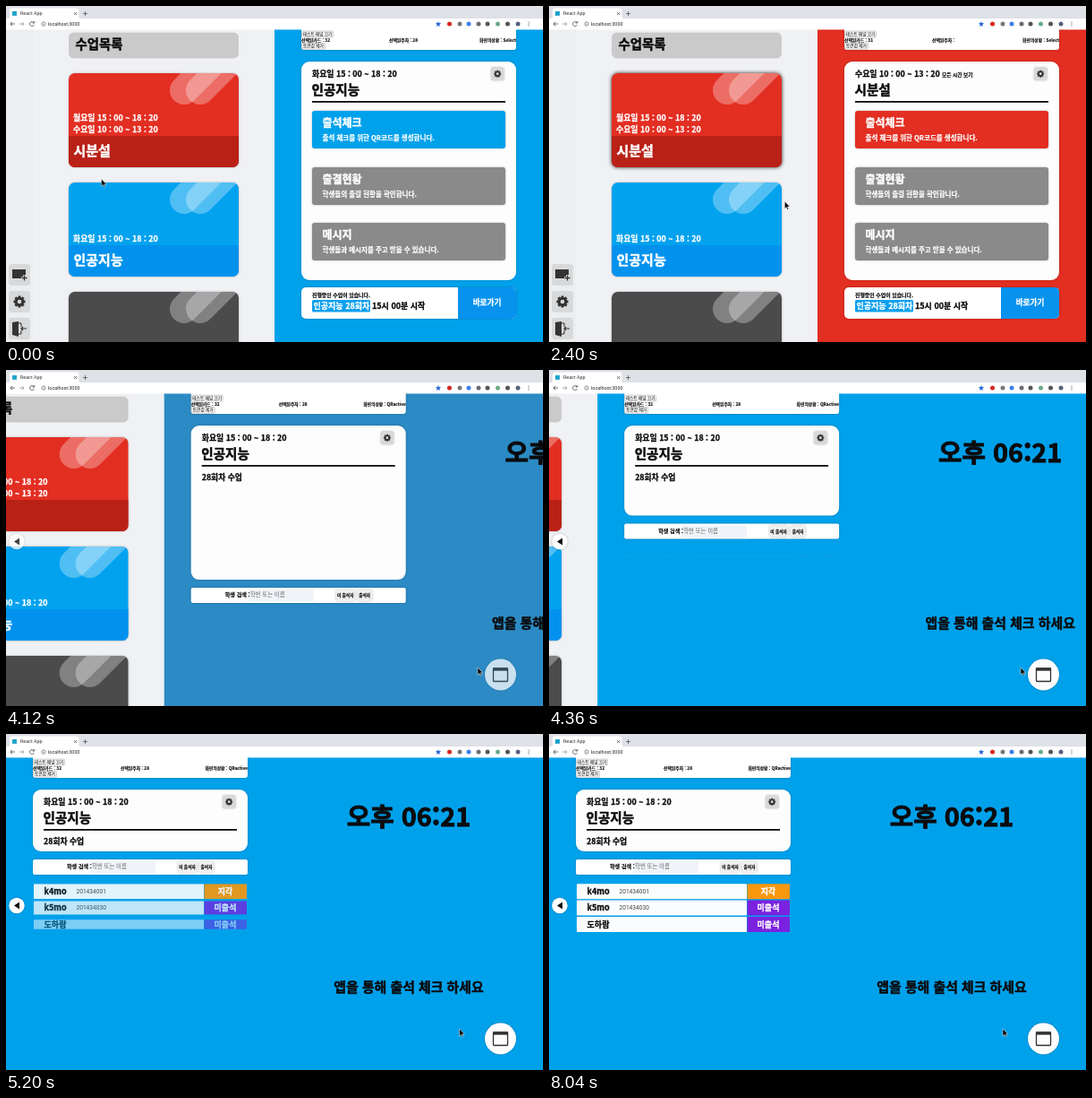
Recreate the animation shown at these times as an HTML page. Size 600 px wide and 375 px high, loop 8.08 s.

```html
<!DOCTYPE html>
<html lang="ko">
<meta charset="utf-8">
<title>React App</title>
<style>
html, body { margin: 0; width: 100%; height: 100%; overflow: hidden }
svg { display: block; width: 600px; height: 375px; font: 900 9px "Noto Sans CJK KR", "Noto Sans CJK", sans-serif }
.ui { font: 400 6px Roboto, sans-serif }
.thin { font-weight: 400 }
.semi { font-weight: 700 }
.ui, .ui text, .thin { stroke: none }
.shade { filter: drop-shadow(0 .7px 1px #0004) }
text { white-space: pre }
</style>
<body>
<script>
const BLUE = '#00a1eb', RED = '#e32e22', GRAY = '#8b8a8b', INK = '#0b0b0d';
const LOOP = 8080, PICK = 1090, OPEN = 3895;

const rect = (x, y, w, h, fill, r = 0, more = '') =>
  `<rect x="${x}" y="${y}" width="${w}" height="${h}" rx="${r}" fill="${fill}" ${more}/>`;
const circle = (x, y, r, fill, more = '') => `<circle cx="${x}" cy="${y}" r="${r}" fill="${fill}" ${more}/>`;
// A thin outline in the fill colour gives the heavy display weight.
const text = (x, y, size, s, fill = INK, more = '') =>
  `<text x="${x}" y="${y}" fill="${fill}" stroke="${fill}" stroke-width="${size * .03}" style="font-size:${size}px" ${more}>${s}</text>`;
const line = (d, color, w = 1, more = '') => `<path d="${d}" fill="none" stroke="${color}" stroke-width="${w}" ${more}/>`;
const group = (id, inner, more = '') => `<g id="${id}" ${more}>${inner}</g>`;
const MID = 'text-anchor="middle"', END = 'text-anchor="end"';

const gear = (x, y, r) => `<g transform="translate(${x} ${y})">` +
  circle(0, 0, r * .58, 'none', `stroke="#333" stroke-width="${r * .46}"`) +
  [0, 45, 90, 135].map(a => line(`M0 ${-r}V${-r * .7}M0 ${r}V${r * .7}`, '#333', r * .45, `transform="rotate(${a})"`)).join('') + '</g>';

function lesson(id, y, fill, band, times, name) {
  const stripe = x => line(`M${x} ${y + 19}l50 -50`, '#fff', 32, 'stroke-linecap="round" opacity=".3"');
  return group(id, `<clipPath id="c${id}">${rect(70, y, 190, 105, '#000', 7)}</clipPath><g clip-path="url(#c${id})">` +
    rect(70, y, 190, 105, fill) + rect(70, y + 70, 190, 35, band) + stripe(199) + stripe(217) +
    times.map((s, i) => text(75, y + 66 - 13 * (times.length - 1 - i), 8.9, s, '#fff')).join('') +
    text(75.5, y + 92, 15, name, '#fff') + '</g>', 'class="shade"');
}

const sideButton = (y, icon) => rect(3, y, 24, 24, '#d8d9da', 3) + icon;

const list = rect(0, 26, 300, 349, '#f0f1f4') + rect(0, 26, 30, 349, '#eceef0') +
  rect(70.5, 30, 189, 28, '#cacaca', 5, 'stroke="#bfbfbf" stroke-width=".6"') + text(77.5, 48, 14.4, '수업목록') +
  lesson('red', 75, RED, '#b92117', ['월요일 15 : 00 ~ 18 : 20', '수요일 10 : 00 ~ 13 : 20'], '시분설') +
  lesson('blue', 197, '#03a2ee', '#0292ee', ['화요일 15 : 00 ~ 18 : 20'], '인공지능') +
  lesson('dark', 319, '#4b4b4b', '#333', [], '') +
  sideButton(288, '<path d="M7 294h15v10H7z" fill="#333"/>' + line('M20.5 300v7M17 303.5h7', '#d8d9da', 3) + line('M20.5 300.5v6M17.5 303.5h6', '#333', 1.3)) +
  sideButton(318, gear(15, 330, 6.5)) +
  sideButton(348, '<path d="M7 353l7 -1v17l-7 -2z" fill="#333"/>' + line('M14 354h3v4M14 366h3v-4', '#333') + line('M23 360h-6m2 -2l-2 2 2 2', '#333', 1.2));

const menuItem = (y, title, note, id) =>
  rect(42, y, 216, 42, GRAY, 3, `class="shade" ${id ? `id="${id}"` : ''}`) +
  text(53.5, y + 17.5, 12, title, '#fff') + text(53.5, y + 33, 7.5, note, '#fff', 'class="semi"');

const tinyButton = (x, y, w, h, size, s) =>
  rect(x, y, w, h, '#efefef', 1, 'stroke="#aaa" stroke-width=".5"') + text(x + w / 2, y + h / 2 + size * .36, size, s, INK, MID + ' class="thin"');

const testBox = rect(30, 24, 240, 25, '#fff', 3, 'class="shade"') +
  tinyButton(30.5, 28, 35, 7, 4.7, '테스트 패널 끄기') + tinyButton(30.5, 41.3, 26, 7, 4.7, '토큰값 제거') +
  text(30, 40, 4.8, '', INK, 'id="cardNo"') + text(128, 40, 4.8, '', INK, 'id="week"') + text(270, 40, 4.8, '', INK, END + ' id="mode"');

const heading = text(42, 78.6, 8.9, '', INK, 'id="time"') + text(139, 78.5, 5.7, '모든 시간 보기', INK, 'id="allTimes"') +
  text(41.5, 99.2, 14.6, '', INK, 'id="subject"') + rect(42, 106, 216, 1.8, INK) +
  rect(242, 68.5, 14.5, 14.5, '#d8d9da', 2, 'class="shade"') + gear(249.2, 75.7, 4);

const menu = menuItem(117, '출석체크', '출석 체크를 위한 QR코드를 생성합니다.', 'check') +
  menuItem(180, '출결현황', '학생들의 출결 현황을 확인합니다.') +
  menuItem(242, '메시지', '학생들과 메시지를 주고 받을 수 있습니다.') +
  rect(30, 314, 240, 35, '#fff', 5, 'class="shade"') +
  '<path d="M205 314h60a5 5 0 0 1 5 5v25a5 5 0 0 1 -5 5h-60z" fill="#0792ee"/>' +
  text(237.5, 334, 8.6, '바로가기', '#fff', MID) + text(42, 325, 5.9, '진행중인 수업이 있습니다.') +
  rect(42, 328, 65, 13.5, '#0ba0ee', 1.5) + text(43.5, 338, 9, '인공지능 28회차', '#fff', 'class="semi"') +
  text(109, 338, 9, '15시 00분 시작', INK, 'class="semi"');

const students = [['k4mo', '201434001', '지각', '#f9970d'], ['k5mo', '201434030', '미출석', '#7a22df'], ['도하람', '', '미출석', '#7a22df']];
const rowY = i => 167.2 + i * 18.4;
const row = ([name, no, state, color], i) => {
  const y = rowY(i);
  return `<clipPath id="clip${i}">${rect(30, y, 240, 0, '#000', 0, `id="slot${i}"`)}</clipPath>` +
    group('row' + i, rect(31, y, 190, 17, '#fafcfd', 1) + rect(221.5, y, 47.5, 17, color, 1) +
      text(55, y + 11.8, 9, name, INK, MID) + text(78.5, y + 10.8, 6.6, no, '#444', 'class="ui"') +
      text(245, y + 11.8, 9, state, '#fff', MID + ' class="semi"'), `clip-path="url(#clip${i})"`);
};

const roster = rect(30, 140, 240, 17, '#fff', 2, 'class="shade"') + rect(94, 142, 73, 13, '#f0f3f8') +
  text(68, 150.2, 6.1, '학생 검색 :') + text(96, 150.2, 6.4, '학번 또는 이름', '#666', 'class="thin"') +
  [[192, 21, '미 출석자'], [215.5, 17, '출석자']].map(([x, w, s]) =>
    rect(x, 142, w, 13, '#f0f0f0', 2, 'class="shade"') + text(x + w / 2, 150, 4.7, s, INK, MID)).join('') +
  students.map(row).join('');

const panel = rect(0, 26, 600, 349, BLUE, 0, 'id="back"') + testBox +
  rect(30, 62, 240, 244, '#fdfdfd', 9, 'id="sheet" class="shade"') + heading + group('menu', menu) +
  group('lecture', text(42, 123, 8.8, '28회차 수업', INK, 'class="semi"') + group('roster', roster) +
    text(450, 103, 28.8, '오후 06:21', INK, MID) + text(450, 287.8, 14.9, '앱을 통해 출석 체크 하세요', INK, MID + ' class="semi"'));

const floating = circle(12, 191.5, 8.7, '#fff', 'class="shade"') + `<path d="M9 191.5l6 -4v8z" fill="${INK}"/>` +
  circle(552.5, 340, 17.5, '#fdfdfd', 'class="shade"') + rect(544.5, 333, 16, 14.5, 'none', .5, 'stroke="#333" stroke-width="1.3"') + rect(544, 332.5, 17, 3.2, '#333');

const extensions = [[495.5, '#d5271f'], [507, '#777'], [517, '#3f7fe8'], [528, '#6a6a75'], [538, '#555'], [549.5, '#69ab86'], [560.5, '#555'], [572, '#56627d']];
const browser = rect(0, 0, 600, 14.5, '#dee1e6') + rect(0, 14, 600, 12.4, '#fff') +
  '<path d="M2 14.5q2 0 2 -2V5q0 -2.5 2.5 -2.5H79q2.5 0 2.5 2.5v7.5q0 2 2 2z" fill="#fff"/>' +
  rect(7, 5.8, 5, 5, '#1fa4c9') + text(16, 10.3, 5.4, 'React App', '#333') +
  line('M76 7l3 3m0 -3l-3 3M86 8.5h5m-2.5 -2.5v5', '#444', .7) +
  line('M10 20H5m2.2 -2.2L5 20l2.2 2.2', '#444', .8) + line('M15 20h5m-2.2 -2.2L20 20l-2.2 2.2', '#999', .8) +
  line('M31.2 18.7a2.5 2.5 0 1 0 .2 2.2M31.5 17v2h-2', '#444', .8) +
  circle(42, 20, 2.2, 'none', 'stroke="#555" stroke-width=".6"') + line('M42 19.7v1.6M42 18.6v.6', '#555', .6) +
  text(47, 22, 5.4, 'localhost:3000', '#222') +
  '<path d="M483 17l.9 2 2.2 .2 -1.7 1.5 .5 2.2 -1.9 -1.2 -1.9 1.2 .5 -2.2 -1.7 -1.5 2.2 -.2z" fill="#2868d8"/>' +
  extensions.map(([x, c]) => circle(x, 20, 2.5, c)).join('') + [18, 20, 22].map(y => circle(584, y, .6, '#444')).join('');

document.body.innerHTML = '<svg viewBox="0 0 600 375">' + group('list', list) + group('panel', panel) + group('floating', floating) +
  group('browser', browser, 'class="ui"') +
  '<path id="cursor" d="M0 0V8.2L1.9 6.4 3.1 9.2 4.4 8.6 3.2 5.9H5.8Z" fill="#000" stroke="#fff" stroke-width=".5"/></svg>';

const $ = id => document.getElementById(id);
const set = (id, name, value) => $(id).setAttribute(name, value);
const move = (id, x, y = 0) => set(id, 'transform', `translate(${x} ${y})`);
const show = (id, on) => set(id, 'opacity', +on);
const unit = v => Math.max(0, Math.min(1, v));
const mix = (a, b, p) => a + (b - a) * p;

// CSS "ease": cubic-bezier(.25, .1, .25, 1)
function ease(x) {
  if (x <= 0 || x >= 1) return unit(x);
  const curve = (a, b, s) => 3 * a * s * (1 - s) ** 2 + 3 * b * s * s * (1 - s) + s ** 3;
  let lo = 0, hi = 1;
  for (let i = 0; i < 20; i++) {
    const s = (lo + hi) / 2;
    if (curve(.25, .25, s) < x) lo = s; else hi = s;
  }
  return curve(.1, 1, lo);
}
const during = (t, start, length) => ease((t - start) / length);
const blend = p => `rgb(${[[0, 227], [161, 46], [235, 34]].map(([a, b]) => Math.round(mix(a, b, p)))})`;

const path = [[0, 106.5, 193], [150, 106.5, 193], [800, 119.5, 156], [1800, 119.5, 156], [3300, 527, 332], [4450, 527, 332], [5100, 506.5, 329], [LOOP, 507, 329]];
function cursorAt(t) {
  const i = path.findIndex(p => p[0] > t), [t0, x0, y0] = path[i - 1], [t1, x1, y1] = path[i];
  const u = (t - t0) / (t1 - t0), p = u * u * (3 - 2 * u);
  return [mix(x0, x1, p), mix(y0, y1, p)];
}

function draw(t) {
  const picked = t >= PICK && t < OPEN, open = t >= OPEN;
  const slide = during(t, OPEN, 900), height = mix(244, 69, slide);
  move('list', -300 * slide);
  move('panel', 300 * (1 - slide));
  move('roster', 0, height - 69);
  set('sheet', 'height', height);
  set('back', 'fill', blend(during(t, PICK, 500) - during(t, OPEN, 450)));
  set('check', 'fill', picked ? RED : BLUE);
  $('cardNo').textContent = '선택된카드 : ' + (picked ? 31 : 32);
  $('week').textContent = '선택된주차 : ' + (picked ? '' : 28);
  $('mode').textContent = '화면의상황 : ' + (open ? 'QRactive' : 'Select');
  $('time').textContent = picked ? '수요일 10 : 00 ~ 13 : 20' : '화요일 15 : 00 ~ 18 : 20';
  $('subject').textContent = picked ? '시분설' : '인공지능';
  show('allTimes', picked);
  show('menu', !open);
  show('lecture', open);
  show('floating', unit((t - OPEN) / 300));
  students.forEach((_, i) => {
    const start = 4260 + 250 * i, h = 18 * during(t, start, 1300);
    set('slot' + i, 'y', rowY(i) + 8.5 - h / 2);
    set('slot' + i, 'height', h);
    show('row' + i, during(t, start, 1500));
  });
  const hover = during(t, 500, 300) - during(t, 2380, 300);
  $('red').style.filter = `drop-shadow(0 ${.7 + .3 * hover}px ${1 + 1.2 * hover}px rgba(0,0,0,${.27 + .63 * hover}))`;
  move('cursor', ...cursorAt(t));
}

const begin = performance.now();
function tick() {
  draw((performance.now() - begin) % LOOP);
  requestAnimationFrame(tick);
}
tick();
</script>
</body>
</html>
```
